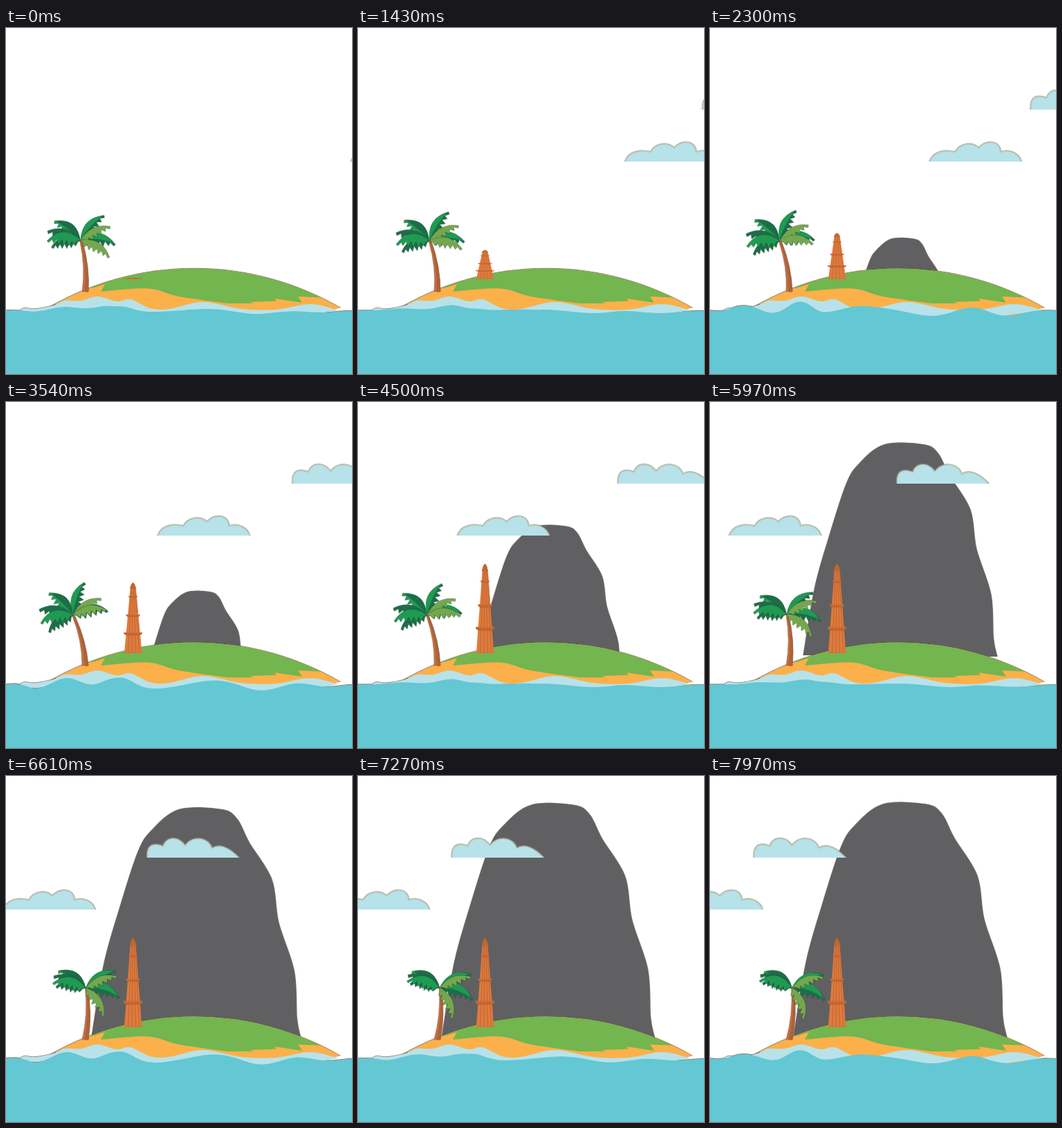
An HTML page with a canvas that plays this animation: 500 by 500 pixels, repeating every 8 s.

```html
<!DOCTYPE html>
<html lang="en">
<head>
<meta charset="utf-8">
<title>Island</title>
<style>
html, body { margin: 0; width: 100%; height: 100%; overflow: hidden; background: #fff; }
canvas { display: block; width: 100vw; height: 100vh; }
</style>
</head>
<body>
<canvas id="stage" width="500" height="500"></canvas>
<script>
const ctx = document.getElementById('stage').getContext('2d');
const LOOP = 8000;
const FRINGE = 'rgba(95, 72, 58, .75)';
const SEA = '#63c7d4', FOAM = '#b7e2ea', SAND = '#fcb04a', GRASS = '#73b54f', ROCK = '#606062';
const DARK = '#1c6e48', MID = '#1f9a53', OLIVE = '#74a74e';
const BRICK = '#de7b3d', BRICK_DARK = '#c26432';

const lerp = (a, b, k) => a + (b - a) * k;
const clamp = k => Math.min(1, Math.max(0, k));
const ease = k => (1 - Math.cos(Math.PI * clamp(k))) / 2;

// Straight moves between [time, value] keys
function track(t, ...keys) {
  let i = 0;
  while (i < keys.length - 2 && t > keys[i + 1][0]) i++;
  const [[t0, a], [t1, b]] = [keys[i], keys[i + 1]];
  return lerp(a, b, clamp((t - t0) / (t1 - t0)));
}

function lines(p, path = new Path2D()) {
  for (let i = 0; i < p.length; i += 2) path.lineTo(p[i], p[i + 1]);
  return path;
}

function spline(p, path = new Path2D()) {
  const n = p.length / 2;
  const at = (i, c) => p[2 * Math.min(n - 1, Math.max(0, i)) + c];
  path.lineTo(p[0], p[1]);
  for (let i = 0; i < n - 1; i++) {
    const a = c => at(i, c) + (at(i + 1, c) - at(i - 1, c)) / 6;
    const b = c => at(i + 1, c) - (at(i + 2, c) - at(i, c)) / 6;
    path.bezierCurveTo(a(0), a(1), b(0), b(1), at(i + 1, 0), at(i + 1, 1));
  }
  return path;
}

function fill(path, color) {
  ctx.fillStyle = color;
  ctx.fill(path);
}

// Faint edge that mostly shows against a bright ground
function edge(path, width = 1.6, color = FRINGE) {
  ctx.lineJoin = 'round';
  ctx.lineWidth = width;
  ctx.strokeStyle = color;
  ctx.stroke(path);
}

// One silhouette that rises and swells
const ROCK_SIDE = [121,377, 139,270, 162,188, 189,105, 210,72, 250,42, 312,42, 335,56, 353,91, 386,145, 396,208, 419,280, 423,350, 429,379];

function mountain(t) {
  const top = track(t, [1450, 354], [2300, 305], [3540, 275], [5370, 94], [5810, 65], [6640, 48], [7400, 41]);
  const size = track(t, [1450, .5], [3540, .54], [5370, .84], [6640, .985], [7400, 1]);
  const path = spline(ROCK_SIDE.map((v, i) => i % 2 ? top + (v - 42) * size : 275 + (v - 275) * size));
  edge(path);
  fill(path, ROCK);
}

function cloud(x, y, bumps) {
  ctx.save();
  ctx.translate(x, y);
  const path = new Path2D();
  path.moveTo(0, 0);
  bumps.forEach(b => path.bezierCurveTo(...b));
  edge(path, 2, 'rgba(125, 120, 95, .5)');
  fill(path, FOAM);
  edge(path, 3, 'rgba(170, 165, 130, .3)');
  ctx.restore();
}

function clouds(t) {
  const high = track(t, [0, 555], [5225, 347], [8000, 60.5]);
  const low = track(t, [0, 498.7], [6136, 14.6], [8000, -58]);
  cloud(high, 118, [
    [-1, -14, 4, -24, 23, -17],
    [27, -30, 44, -33, 55, -18],
    [65, -32, 88, -31, 94, -14],
    [106, -22, 122, -12, 133, 0]
  ]);
  cloud(low, 193, [
    [5, -14, 20, -18, 37, -14],
    [44, -27, 62, -29, 71, -20],
    [82, -32, 102, -31, 103, -14],
    [116, -19, 130, -11, 133, 0]
  ]);
}

function hill(from, to) {
  const angle = x => -Math.acos((x - 272) / 420);
  const path = new Path2D();
  path.arc(272, 767.5, 420, angle(from), angle(to));
  return path;
}

function island() {
  const sand = hill(60, 483);
  edge(sand);
  lines([430,421, 75,421], sand);
  fill(sand, SAND);
  const grass = lines([422,388, 428,397, 388,391, 391,394.5, 352,396, 358,398], hill(118, 455));
  spline([320,398, 250,388, 205,376.5, 137,381], grass);
  fill(lines([143,370, 128,375], grass), GRASS);
}

function foam() {
  const path = spline([19,409, 27,404.5, 42,406, 68,401, 85,394, 108,394, 132,388, 160,395, 180,392, 208,405,
    235,406, 285,396, 340,406, 390,407, 440,399, 481,408]);
  ctx.save();
  ctx.beginPath();
  ctx.rect(0, 380, 72, 60);
  ctx.clip();
  edge(path, 1.4);
  ctx.restore();
  fill(lines([458,411, 434,414, 410,420, 75,420, 60,412, 35,413], path), FOAM);
}

// A resting line plus a standing wave, tighter around x = 195
function seaPath(t) {
  const rest = [0,8, 30,8, 75,5, 100,5.5, 138,1, 165,4.5, 200,8, 275,7, 350,12, 390,9.5, 440,11.5, 500,8.5];
  const level = x => {
    let i = 0;
    while (i < rest.length - 4 && x > rest[i + 2]) i += 2;
    return lerp(rest[i + 1], rest[i + 3], ease((x - rest[i]) / (rest[i + 2] - rest[i])));
  };
  const swing = Math.cos(2 * Math.PI * (t - 3670) / 3070);
  const p = [-5, 408];
  for (let x = 0; x <= 500; x += 10) {
    const warp = .95 * Math.exp(-(((x - 195) / 90) ** 2));
    const wave = Math.cos(Math.PI * ((x - 48) / 54.6 + warp));
    const fade = Math.min(1, x / 40, (500 - x) / 100);
    p.push(x, 400 + level(x) + 6.5 * fade * wave * swing);
  }
  return lines([505,408.5, 505,505, -5,505], spline(p));
}

function tower(t) {
  const height = track(t, [0, 1.2], [4620, 132], [6130, 128]);
  const half = h => 12.5 - .073 * h;
  const floors = [0, 34, 67, 102, 118];
  ctx.save();
  ctx.translate(183.5, 362.5);
  ctx.scale(1, height / 128);
  for (let i = 0; i < 4; i++) {
    const y0 = -floors[i + 1], y1 = -floors[i];
    const w0 = half(-y0), w1 = half(-y1);
    const body = lines([-w0, y0, w0, y0, w1, y1, -w1, y1]);
    edge(body, .8, BRICK_DARK);
    fill(body, BRICK);
    for (const k of [-.55, -.12, .32, .74]) edge(lines([w0 * k, y0, w1 * k, y1]), 1, BRICK_DARK);
  }
  for (const h of floors.slice(1)) {
    const w = half(h), out = w + 4.6 - h * .034, deep = 6.5 - h * .033;
    const y = -h - deep * .6;
    fill(lines([-out, y, out, y, out, y + deep * .4, w, y + deep, -w, y + deep, -out, y + deep * .4]), BRICK_DARK);
    fill(lines([-out, y, out, y, out, y + deep * .3, -out, y + deep * .3]), '#cf6f37');
  }
  fill(spline([-3.8, -119, -3, -124, 0, -128, 3, -124, 3.8, -119]), BRICK_DARK);
  ctx.restore();
}

// A frond with an arched back and a ragged lower side
function frond(angle, length, bow, width, color, flip, vein) {
  ctx.save();
  ctx.rotate(angle * Math.PI / 180);
  if (flip) ctx.scale(1, -1);
  const back = k => -4 * bow * k * (1 - k);
  const path = new Path2D();
  path.moveTo(0, 1);
  path.quadraticCurveTo(length * .5, -2 * bow, length, 0);
  for (let k = .86; k > .1; k -= .15) {
    const w = width * Math.sin(Math.PI * Math.pow(k, .75));
    path.lineTo(length * (k + .1), back(k) + w + 3);
    path.lineTo(length * (k - .01), back(k) + w * .75);
  }
  path.closePath();
  edge(path, 1.2, 'rgba(40, 70, 50, .55)');
  fill(path, color);
  if (vein) {
    const upper = new Path2D();
    upper.moveTo(0, 0);
    upper.quadraticCurveTo(length * .5, -2 * bow, length * .95, -1);
    upper.quadraticCurveTo(length * .5, -2 * bow + width * 1.1, 0, 0);
    fill(upper, vein);
  }
  ctx.restore();
}

function palm(t) {
  const s = t < 3540 ? -.0031 * t : lerp(-11, 11, ease((t - 3540) / 4100));
  const top = 108.5 + s, bend = 118 + .45 * s, y = 308 - .08 * s;
  const trunk = (left, right, mid, color) => {
    const path = new Path2D();
    path.moveTo(left, 381);
    path.quadraticCurveTo(bend + mid, 345, top + mid * .6, y);
    path.lineTo(top + 2, y);
    path.quadraticCurveTo(bend + 3, 345, right, 381);
    path.closePath();
    edge(path, .6);
    fill(path, color);
  };
  trunk(110, 119, -3, '#c66d3c');
  trunk(114.5, 119, 0, '#ab643c');

  ctx.save();
  ctx.translate(top - 1, y - 2);
  frond(-46 + 2.2 * s, 49, 10, 14, DARK, false, MID);
  frond(166 + 2 * s, 43, 10, 14, DARK, true);
  frond(8 + 1.2 * s, 51, 13, 16, DARK, false, MID);
  frond(216 - .6 * s, 46, 11, 17, MID, true, DARK);
  frond(-24 + .5 * s, 47, 8, 11, OLIVE, false);
  frond(195 + .6 * s, 49, 9, 15, DARK, true);
  frond(178 + 1.2 * s, 48, 12, 15, MID, true);
  frond(31 + 3.5 * s, 49, 10, 12, OLIVE, false);
  ctx.restore();
}

function draw(t) {
  ctx.fillStyle = '#fff';
  ctx.fillRect(0, 0, 500, 500);
  const sea = seaPath(t);
  edge(sea);
  mountain(t);
  clouds(t);
  island();
  tower(t);
  palm(t);
  foam();
  fill(sea, SEA);
}

function tick() {
  draw(performance.now() % LOOP);
  requestAnimationFrame(tick);
}
tick();
</script>
</body>
</html>
```
